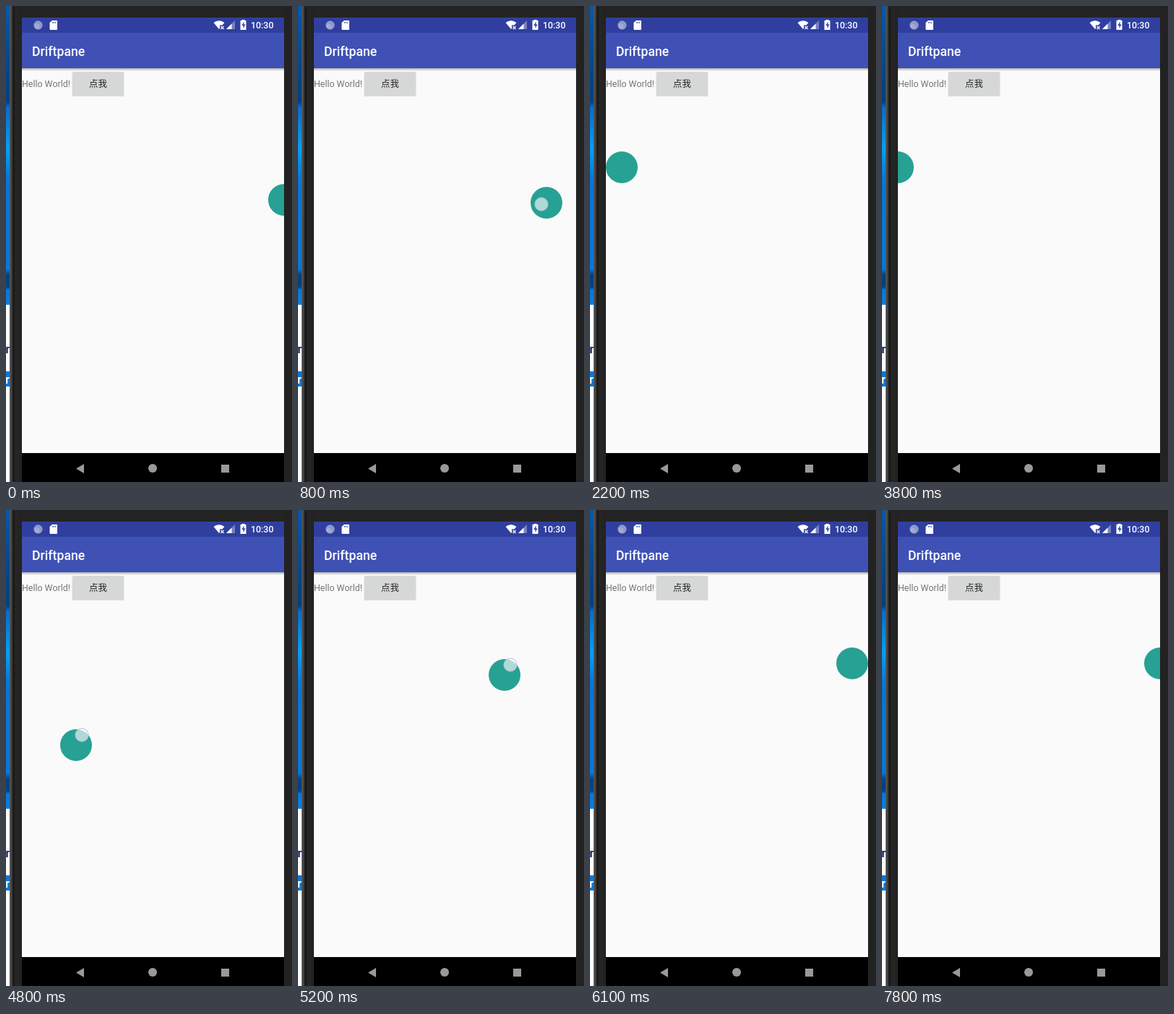
Recreate the animation shown at these times as an HTML page. Size 396 by 658 pixels, loop 8000 ms.

```html
<!DOCTYPE html>
<html lang="zh">
<head>
<meta charset="utf-8">
<title>Floating button</title>
<style>
  html, body { margin: 0; width: 100%; height: 100%; overflow: hidden; background: #fff; }
  svg { display: block; width: 396px; height: 658px; }
  text { font-family: Roboto, "Noto Sans CJK SC", "Noto Sans CJK", sans-serif; }
  .medium { font-weight: 500; }
</style>
</head>
<body>
<svg viewBox="0 0 396 658">
  <defs>
    <linearGradient id="desktop" x2="0" y2="1">
      <stop offset="0" stop-color="#0758a8"/>
      <stop offset=".2" stop-color="#06468a"/>
      <stop offset=".32" stop-color="#053f7c"/>
      <stop offset=".34" stop-color="#0a6cc8"/>
      <stop offset=".48" stop-color="#06a0f4"/>
      <stop offset=".58" stop-color="#0876d6"/>
      <stop offset=".88" stop-color="#0878d8"/>
      <stop offset=".9" stop-color="#07407c"/>
      <stop offset=".94" stop-color="#07407c"/>
      <stop offset=".95" stop-color="#0878d8"/>
      <stop offset="1" stop-color="#0a7fdf"/>
    </linearGradient>
    <linearGradient id="edge">
      <stop offset="0" stop-color="#5a5a5a"/>
      <stop offset=".2" stop-color="#3a3a3a"/>
      <stop offset=".28" stop-color="#161616"/>
      <stop offset=".5" stop-color="#262626"/>
      <stop offset="1" stop-color="#222"/>
    </linearGradient>
    <linearGradient id="shade" x2="0" y2="1">
      <stop offset="0" stop-opacity=".3"/>
      <stop offset="1" stop-opacity="0"/>
    </linearGradient>
    <clipPath id="screen"><rect x="22" y="86" width="363" height="532"/></clipPath>
    <clipPath id="strip"><rect width="5" height="658"/></clipPath>
  </defs>

  <!-- desktop behind the phone -->
  <g clip-path="url(#strip)">
    <rect width="6" height="658" fill="#fff"/>
    <rect width="6" height="413" fill="url(#desktop)"/>
    <text x="-9" y="480" font-size="16" font-weight="700" fill="#14246e">an</text>
    <rect y="505" width="6" height="21" fill="#0878d8"/>
    <text x="-1" y="522" font-size="16" font-weight="700" fill="#fff">r</text>
  </g>

  <!-- phone body -->
  <rect x="5" width="391" height="658" fill="#242424"/>
  <rect x="5" width="17" height="658" fill="url(#edge)"/>
  <rect x="385" width="11" height="658" fill="#222"/>

  <!-- screen -->
  <rect x="22" y="86" width="363" height="532" fill="#fafafa"/>
  <rect x="22" y="86" width="363" height="4" fill="url(#shade)"/>
  <rect x="22" y="16" width="363" height="21" fill="#303f9f"/>
  <rect x="22" y="37" width="363" height="49" fill="#3f51b5"/>
  <rect x="22" y="618" width="363" height="40" fill="#000"/>

  <!-- status icons -->
  <circle cx="44.5" cy="26.5" r="5.5" fill="#8b94c8" stroke="#aeb5dc"/>
  <circle cx="43" cy="28" r="3.8" fill="#b3b9dc" opacity=".55"/>
  <path d="M64 20h6q1 0 1 1v11q0 1-1 1h-8.500q-1 0-1-1v-9z" fill="#fff"/>
  <path d="M64.500 22v2M66.500 22v2M68.500 22v2" stroke="#303f9f" stroke-width=".9"/>
  <path d="M287.500 23Q295 17.500 302.500 23L299.500 26.500H296V31L295 32z" fill="#fff"/>
  <path d="M297.500 28l4 4m0-4l-4 4" stroke="#fff" stroke-width="1.300"/>
  <path d="M317 20v12h-12z" fill="#7982c0"/>
  <path d="M312.500 24.500v7.500h-7.500z" fill="#fff"/>
  <path d="M326.500 20v-1h4v1h2v13h-8V20z" fill="#fff"/>
  <path d="M329.500 21.500l-3 5.500h2v4l3-5.500h-2z" fill="#303f9f"/>
  <text class="medium" x="339" y="31" font-size="12.400" fill="#fff">10:30</text>

  <!-- app -->
  <text class="medium" x="36" y="68.500" font-size="17.700" fill="#fff">Driftpane</text>
  <text x="22" y="112" font-size="12.400" fill="#757575">Hello World!</text>
  <rect x="91.500" y="91.500" width="72" height="33.500" rx="2" opacity=".13"/>
  <rect x="92" y="91" width="71" height="32.500" rx="1.500" fill="#d6d7d7"/>
  <text class="medium" x="115" y="112" font-size="12.400" fill="#212121">点我</text>

  <!-- navigation -->
  <g fill="#999">
    <path d="M97 639.500l11-6.500v13z"/>
    <circle cx="203" cy="639" r="6"/>
    <rect x="298" y="634" width="11" height="11"/>
  </g>

  <g clip-path="url(#screen)">
    <circle id="ball" r="22" fill="#26a194"/>
    <circle id="touch" r="9" fill="#fff" fill-opacity=".62" stroke="#c3bedf" stroke-opacity=".8" stroke-width="1.300"/>
  </g>
</svg>
<script>
  const LOOP = 8000;

  // time, x, y of the ball
  const path = [
    [0, 385, 268], [700, 379, 268], [800, 344, 272], [900, 295, 272],
    [1000, 240, 255], [1100, 173, 241], [1200, 148, 225], [1300, 145, 223],
    [1400, 144, 223], ...snap(2000, 144, 44, 223), [3800, 22, 223],
    [4700, 42, 222], [4800, 97, 325], [4900, 203, 355], [5000, 265, 320],
    [5100, 297, 268], [5200, 286, 228], [5300, 284, 226], [5400, 283, 225],
    [5500, 277, 217], [5600, 272, 212], ...snap(5900, 272, 363, 212), [7800, 385, 212]
  ];

  // finger down, finger up, offset from the ball
  const drags = [[600, 1700, -7, 2], [4600, 5700, 8, -14]];

  // glide to the screen edge with eased start and stop
  function snap(start, from, to, y) {
    return [1, 2, 3].map(n => {
      const ease = (1 - Math.cos(Math.PI * n / 3)) / 2;
      return [start + (n - 1) * 100, from + (to - from) * ease, y];
    });
  }

  const at = t => path.filter(p => p[0] <= t).pop();
  const move = (x, y) => `translate(${x}px, ${y}px)`;

  function play(id, steps) {
    const frames = steps.map(([t, style]) => ({ offset: t / LOOP, easing: "step-end", ...style }));
    frames.push({ ...frames[frames.length - 1], offset: 1 });
    document.getElementById(id).animate(frames, { duration: LOOP, iterations: Infinity });
  }

  play("ball", path.map(([t, x, y]) => [t, { transform: move(x, y) }]));

  const touchSteps = [[0, { opacity: 0, transform: move(0, 0) }]];
  for (const [down, up, dx, dy] of drags) {
    for (let t = down; t <= up; t += 100) {
      const [, x, y] = at(t);
      touchSteps.push([t, { opacity: t < up ? 1 : 0, transform: move(x + dx, y + dy) }]);
    }
  }
  play("touch", touchSteps);
</script>
</body>
</html>
```
